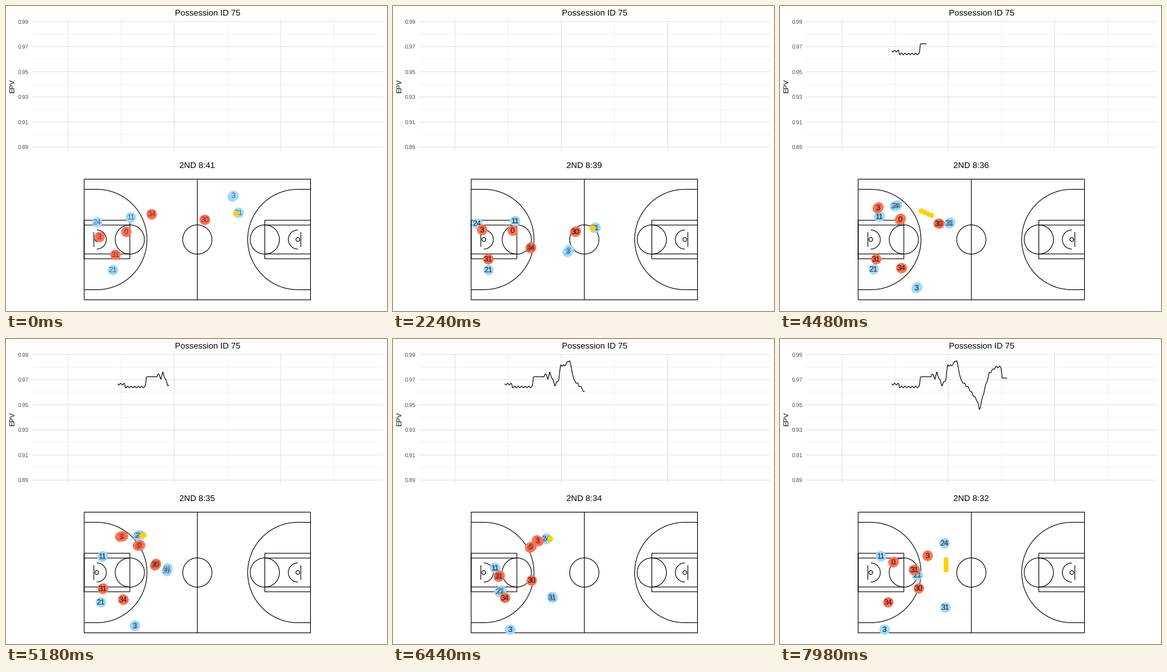
Animation, 600 px wide and 480 px high, one loop 8 s. Source, as a matplotlib script:

```python
import numpy as np
import matplotlib.pyplot as plt
from matplotlib.animation import FuncAnimation

W, H, DPI = 600, 480, 100
PX = 72 / DPI                    # points per pixel
LOOP, TICK, STEP = 8000, 40, 140  # ms
SUBS = 4                         # moments drawn together in each step
BLUE, RED, GOLD = "#A0DAFF", "#FF7256", "#FFD00C"

plt.rcParams.update({"font.family": "Liberation Sans", "path.snap": False,
                     "text.hinting": "none"})
fig = plt.figure(figsize=(W / DPI, H / DPI), dpi=DPI, facecolor="white")
ax = fig.add_axes([0, 0, 1, 1])
ax.set(xlim=(0, W), ylim=(H, 0))
ax.axis("off")


def line(x, y, color="black", lw=1.07, z=1):
    return ax.plot(x, y, color=color, lw=lw * PX, zorder=z,
                   solid_capstyle="butt", solid_joinstyle="round")[0]


def arc(cx, cy, r, a0=0, a1=360):
    a = np.radians(np.linspace(a0, a1, 90))
    line(cx + r * np.cos(a), cy + r * np.sin(a))


def box(x0, y0, x1, y1):
    line([x0, x1, x1, x0, x0], [y0, y0, y1, y1, y0])


def label(x, y, s, size, color="black", **kw):
    kw.setdefault("ha", "center")
    return ax.text(x, y, s, fontsize=size * PX, color=color, **kw)


def dots(color, r, z):
    return ax.scatter([], [], s=(2 * r * PX) ** 2, c=color, linewidths=0, zorder=z)


def draw_chart():
    for k in range(11):
        major = k % 2 == 0
        style = ("#E3E3E3", 1.07, 0) if major else ("#EBEBEB", 0.75, 0)
        y = 24.5 + 19.75 * k
        line([41, 594], [y, y], *style)
        if major:
            label(35.5, y + 3.4, f"{0.99 - 0.01 * k:.2f}", 8.8, "#4D4D4D", ha="right")
        if k < 6:
            x = 97.5 + 83.75 * k
            line([x, x], [23, 227], *style)
    label(317.5, 15, "Possession ID 75", 13.2)
    label(13.5, 125.5, "EPV", 11, rotation=90, rotation_mode="anchor")


def draw_court():
    cx, cy = 301.3, 367.5
    box(cx - 178.2, 272.5, cx + 178.2, 462.4)
    line([cx, cx], [272.5, 462.4])
    arc(cx, cy, 23)
    for m in (-1, 1):
        end, key, hoop, board = (cx + m * d for d in (178.2, 106.3, 158.3, 163))
        box(end, cy - 30.3, key, cy + 30.3)
        arc(key, cy, 23)
        arc(hoop, cy, 3)
        line([board, board], [cy - 11.5, cy + 11.5])
        for r in (15, 79):
            arc(hoop, cy, r, m * 90, m * 90 + 180)
        for s in (-1, 1):
            line([end, key], [cy + 22.7 * s] * 2)
            line([end, hoop], [cy + 79 * s] * 2)


# ---- motion: waypoints x + yj, reached at shared key moments ----
KEYS = np.array([0, 23, 32, 42, 51, 57])

BLUE_TEAM = {
    "24": (143+340j, 143+335j, 182+314j, 233+308j, 247+322j, 259+321j),
    "11": (196+332j, 182+337j, 156+331j, 153+354j, 168+360j, 158+341j),
    "21": (168+415j, 146+415j, 147+414j, 156+410j, 189+378j, 217+371j),
    "3": (358+298j, 245+416j, 215+443j, 192+455j, 175+457j, 164+457j),
    "31": (366+325j, 296+351j, 267+341j, 246+390j, 259+420j, 260+422j),
}
RED_TEAM = {
    "34": (229+327j, 208+398j, 191+412j, 179+406j, 173+410j, 170+414j),
    "30": (313+336j, 273+355j, 250+342j, 223+371j, 216+387j, 218+392j),
    "3": (147+363j, 142+341j, 154+317j, 211+310j, 239+329j, 232+341j),
    "0": (189+355j, 188+348j, 189+335j, 225+319j, 197+341j, 178+351j),
    "31": (172+391j, 146+399j, 151+398j, 157+384j, 184+361j, 212+363j),
}
PASSES = [(30.2, 33.6), (55.5, 60)]   # release and catch


def run(path, t):
    """Cubic Hermite curve through the waypoints."""
    p = np.array(path)
    v = np.gradient(p, KEYS)
    t = np.clip(t, KEYS[0], KEYS[-1])
    i = np.clip(np.searchsorted(KEYS, t, "right") - 1, 0, len(KEYS) - 2)
    h = KEYS[i + 1] - KEYS[i]
    u = (t - KEYS[i]) / h
    w = 1 - u
    return ((1 + 2 * u) * w * w * p[i] + u * w * w * h * v[i]
            + u * u * (1 + 2 * w) * p[i + 1] - u * u * w * h * v[i + 1])


def ball_at(t):
    """Carried by 31, passed to 24, then passed back."""
    first = run(BLUE_TEAM["31"], t) - 4 + 1j
    second = run(BLUE_TEAM["24"], t) + 6
    (out, caught), (back, end) = PASSES
    if t < out:
        return first
    if t < caught:
        u = (t - out) / (caught - out)
        return (1 - u) * ball_at(out - 1e-6) + u * ball_at(caught)
    if t < back:
        return second
    u = (t - back) / (end - back)
    return (1 - u) * ball_at(back - 1e-6) + u * run(BLUE_TEAM["31"], end)


# ---- value curve: main turns plus a small ripple, held flat during passes ----
TURNS = np.array([
    (176, 71), (187, 71), (188, 75.5), (219.5, 75.5), (221, 59.5), (238, 59.5), (239, 54),
    (244, 62), (247, 53), (255, 73), (261, 64), (264, 41), (270, 42), (278, 33), (285, 65),
    (296, 76), (311, 98), (314, 112), (323, 76), (330, 53), (340, 44), (348, 44),
    (350, 61.5), (358, 61.5)])


def curve(tip):
    x = np.append(np.arange(TURNS[0, 0], tip, 0.635), tip)
    t = 32 + (x - 230.5) / 5.08
    held = np.any([(t > a) & (t < b) for a, b in PASSES], axis=0)
    return x, np.interp(x, *TURNS.T) + np.where(held, 0, 1.3 * np.sin(1.14 * x))


class Team:
    def __init__(self, players, color, z):
        self.paths = players.values()
        self.dots = dots(color, 7.8, z)
        self.tags = [label(0, 0, name, 12, alpha=0.3, zorder=z + 1)
                     for name in players for _ in range(SUBS)]

    def place(self, t):
        spots = np.concatenate([run(path, t) for path in self.paths])
        shown = np.tile(np.arange(SUBS) < SUBS - np.sum(t < 0), len(self.paths))
        xy = np.column_stack([spots.real, spots.imag])
        self.dots.set_offsets(xy)
        for tag, (x, y), on in zip(self.tags, xy, shown):
            tag.set_position((x, y + 4.2))
            tag.set_visible(on)


draw_chart()
draw_court()
clock = label(301, 255, "", 13.2)
teams = [Team(BLUE_TEAM, BLUE, 3), Team(RED_TEAM, RED, 5)]
ball = dots(GOLD, 4.1, 7)
trace = line([], [], lw=1.1, z=2)


def draw(k):
    step = (k * TICK + TICK // 2) // STEP
    t = step + (np.arange(SUBS) - (SUBS - 1) / 2) / SUBS
    for team in teams:
        team.place(t)
    ball.set_offsets([(b.real, b.imag) for b in map(ball_at, t)])
    tip = 230.5 + 5.08 * (step - 32)
    trace.set_data(*(curve(tip) if tip > TURNS[0, 0] else ([], [])))
    clock.set_text(f"2ND 8:{int(41.54 - 0.155 * step)}")
    return []


anim = FuncAnimation(fig, draw, frames=LOOP // TICK, interval=TICK,
                     repeat=True, repeat_delay=0, blit=False)
plt.show()
```
